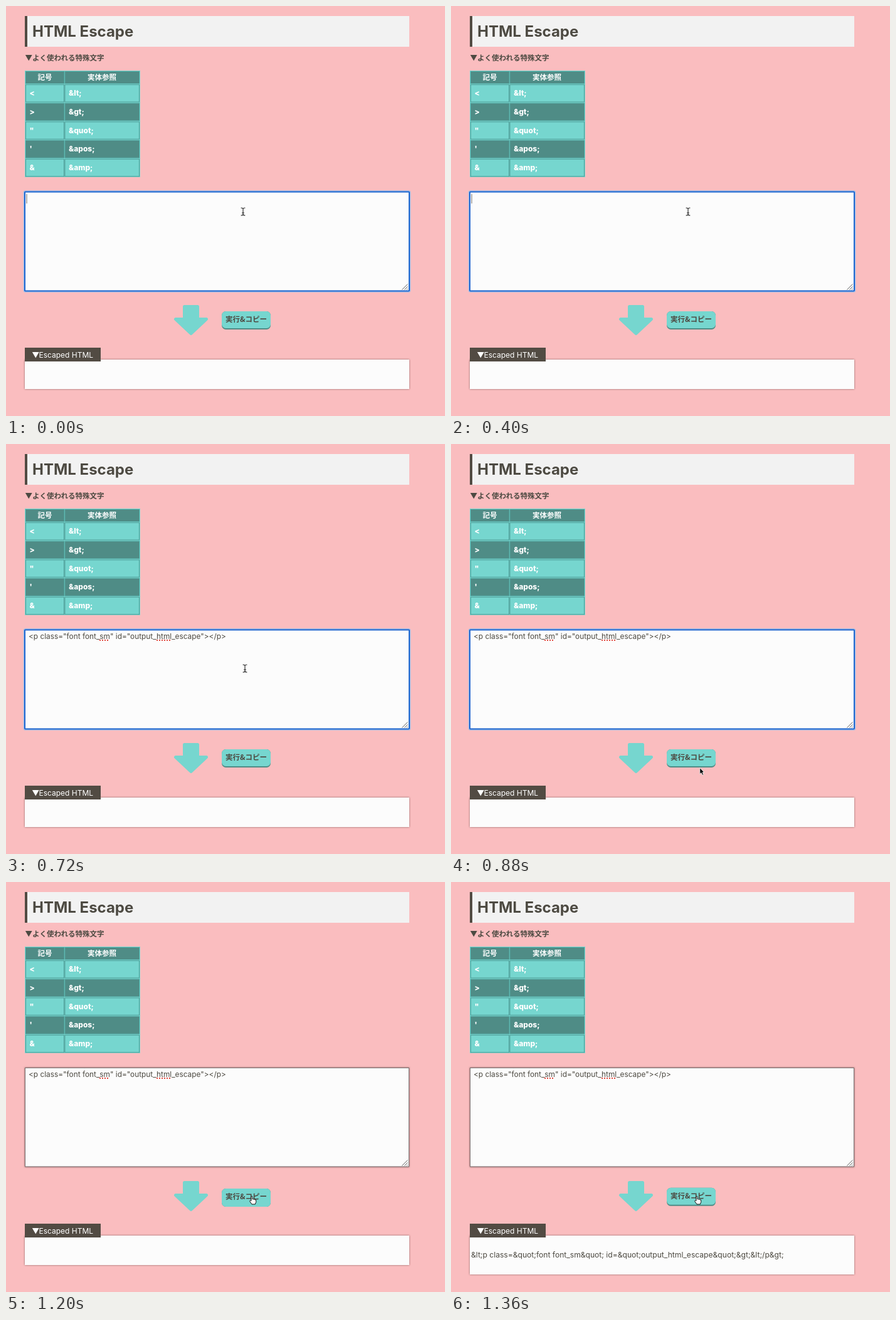
An HTML page for the animation above (1920 ms loop, 700x654 px).

```html
<!DOCTYPE html>
<html lang="ja">
<head>
<meta charset="utf-8">
<title>HTML Escape</title>
<style>
  html, body { margin: 0; width: 100%; height: 100%; overflow: hidden; background: #fabdbf; }
  body { position: relative; }
  svg { position: absolute; left: 0; top: 0; display: block; }
  text, #typed { font-family: Inter, "Noto Sans CJK JP", "Noto Sans CJK", sans-serif; font-size: 12px; fill: #4d4a42; color: #4d4a42; white-space: pre; }
  .ja { font-family: "Noto Sans CJK JP", "Noto Sans CJK", sans-serif; font-size: 11.5px; font-weight: 700; }
  .mid { text-anchor: middle; }
  .white { fill: #fff; }
  .cell { fill: #fff; font-weight: 800; }
  .panel { filter: drop-shadow(0 0 1.5px rgba(60, 30, 30, .6)); }
  #typed { position: absolute; left: 36px; top: 296.8px; line-height: 20px; font-size: 11.85px; }
  #typed u { text-decoration: underline dotted #e0463c 1.5px; text-underline-offset: 1.5px; text-decoration-skip-ink: none; }
  #endCaret { display: inline-block; width: 1px; height: 15px; background: #555; vertical-align: -3px; }
</style>
</head>
<body>
<svg width="700" height="654" viewBox="0 0 700 654">
  <rect x="30" y="16" width="613" height="49" fill="#f2f2f2"/>
  <rect x="30" y="16" width="4" height="49" fill="#524b43"/>
  <text x="42" y="48.7" style="font-size:24px;font-weight:700">HTML Escape</text>
  <text class="ja" x="30.5" y="87.4">▼よく使われる特殊文字</text>

  <g id="table">
    <rect x="30" y="103" width="184" height="170" fill="#76d6cf"/>
  </g>

  <g id="focused">
    <rect x="29" y="295.5" width="615" height="160" rx="2" fill="none" stroke="#9fbde6" stroke-width="2.6"/>
    <rect class="paper" x="30" y="296.5" width="613" height="158" rx="1" stroke="#1f66cf" stroke-width="2"/>
  </g>
  <g id="blurred" class="panel">
    <rect class="paper" x="30.5" y="296.5" width="612" height="157.5" stroke="#786c6c"/>
  </g>
  <path d="M631.5 452.5 640.5 443.5M635.5 452.5 640.5 447.5M639 452.5 640.5 451" stroke="#666" fill="none"/>
  <rect id="startCaret" x="32.5" y="300" width="1" height="15" fill="#666"/>

  <path d="M284.500 479.500H305.500V499.500H319.500L295 522.500 270.500 499.500H284.500Z"
    fill="#76d6cf" stroke="#76d6cf" stroke-width="5" stroke-linejoin="round"/>

  <g id="button">
    <rect id="edge" x="344" y="487" width="78" height="29" rx="6.500" fill="#4f8c86"/>
    <rect id="face" x="344" y="487" width="78" height="27" rx="6.500" fill="#76d6cf"/>
    <text class="ja mid" x="383" y="503.800">実行&amp;コピー</text>
  </g>

  <rect id="result" class="paper panel" x="30" y="564" width="613" height="47"/>
  <rect x="30" y="545" width="121" height="22" fill="#524b43"/>
  <text class="white" x="41.500" y="561"><tspan class="ja" style="font-weight:400">▼</tspan><tspan x="52.500">Escaped HTML</tspan></text>
  <text id="escaped" x="32" y="599" style="font-size:12.1px"></text>

  <g id="cursor">
    <g id="beam" fill="none" stroke-linecap="round">
      <path d="M-3-6Q0-6 0-4Q0-6 3-6M0-4V4M-3 6Q0 6 0 4Q0 6 3 6" stroke="#fff" stroke-width="2.400"/>
      <path d="M-3-6Q0-6 0-4Q0-6 3-6M0-4V4M-3 6Q0 6 0 4Q0 6 3 6M-1.500 2H1.500" stroke="#222" stroke-width="1.100"/>
    </g>
    <path id="arrow" d="M0 0V10L2.300 8 4 11.700 5.800 10.900 4.200 7.300H7Z" fill="#000" stroke="#fff" stroke-width=".8"/>
    <path id="hand" d="M-2.500 1V-5Q-2.500-6.300-1.500-6.300T-.4-5V-1.500Q.6-2.400 1.600-1.200Q2.800-2 3.500-.7Q5.200-1.200 5.200.6V3L3.800 6.500H-1.500L-4.700 2Q-5.200.7-4 .3Z"
      fill="#fff" stroke="#111" stroke-linejoin="round"/>
  </g>
</svg>
<div id="typed">&lt;p class="font font_<u>sm</u>" id="output_<u>html</u>_escape"&gt;&lt;/p&gt;<span id="endCaret"></span></div>

<script>
const LOOP = 1920;
const byId = id => document.getElementById(id);
const show = (id, on) => { byId(id).style.visibility = on ? "visible" : "hidden"; };

function add(parent, name, attrs, text = "") {
  const node = document.createElementNS("http://www.w3.org/2000/svg", name);
  for (const key in attrs) node.setAttribute(key, attrs[key]);
  node.textContent = text;
  parent.append(node);
}

function addRow(y, height, dark) {
  for (const [x, width] of [[31.5, 61], [94, 118.5]]) {
    add(byId("table"), "rect", {
      x, y, width, height, fill: dark ? "#4f8c86" : "#76d6cf", stroke: "#4f9c96"
    });
  }
}

addRow(104.5, 19, true);
add(byId("table"), "text", { class: "ja mid white", x: 62, y: 117.9 }, "記号");
add(byId("table"), "text", { class: "ja mid white", x: 153, y: 117.9 }, "実体参照");
[["<", "lt"], [">", "gt"], ['"', "quot"], ["'", "apos"], ["&", "amp"]].forEach(([mark, name], i) => {
  const y = 125.5 + i * 29.7;
  addRow(y, 27.5, i % 2);
  add(byId("table"), "text", { class: "cell", x: 37.5, y: y + 17.8 }, mark);
  add(byId("table"), "text", { class: "cell", x: 100, y: y + 17.8 }, `&${name};`);
});

const names = { "<": "lt", ">": "gt", '"': "quot" };
byId("escaped").textContent = byId("typed").textContent.replace(/[<>"]/g, c => `&${names[c]};`);

// start time, cursor shape, x, y
const moves = [
  [0, "beam", 378, 328],
  [720, "beam", 381, 358],
  [800, "arrow", 392, 470],
  [880, "arrow", 396.8, 516.5],
  [960, "hand", 393.5, 508],
  [1040, "hand", 393.5, 507.5]
];

function draw(time) {
  const within = (from, to = LOOP) => time >= from && time < to;
  const filled = within(480);
  const pressed = within(1200, 1360);
  const done = within(1360);

  const [, shape, x, y] = moves.findLast(move => move[0] <= time);
  for (const id of ["beam", "arrow", "hand"]) show(id, id === shape);
  byId("cursor").setAttribute("transform", `translate(${x} ${y})`);

  show("startCaret", !filled);
  show("typed", filled);
  show("endCaret", within(480, 560) || within(960, 1200));
  show("focused", !within(1200));
  show("blurred", within(1200));

  const drop = pressed ? 2 : within(960) ? 0.8 : 0;
  byId("button").setAttribute("transform", `translate(0 ${drop})`);
  byId("face").setAttribute("height", pressed ? 29 : 27);

  show("escaped", done);
  byId("result").setAttribute("height", done ? 62 : 47);
  const paper = within(560, 640) ? "#f8f6fa" : "#fcfcfc";
  document.querySelectorAll(".paper").forEach(node => node.setAttribute("fill", paper));
}

const start = performance.now();
function tick() {
  draw((performance.now() - start) % LOOP);
  requestAnimationFrame(tick);
}
tick();
</script>
</body>
</html>
```
